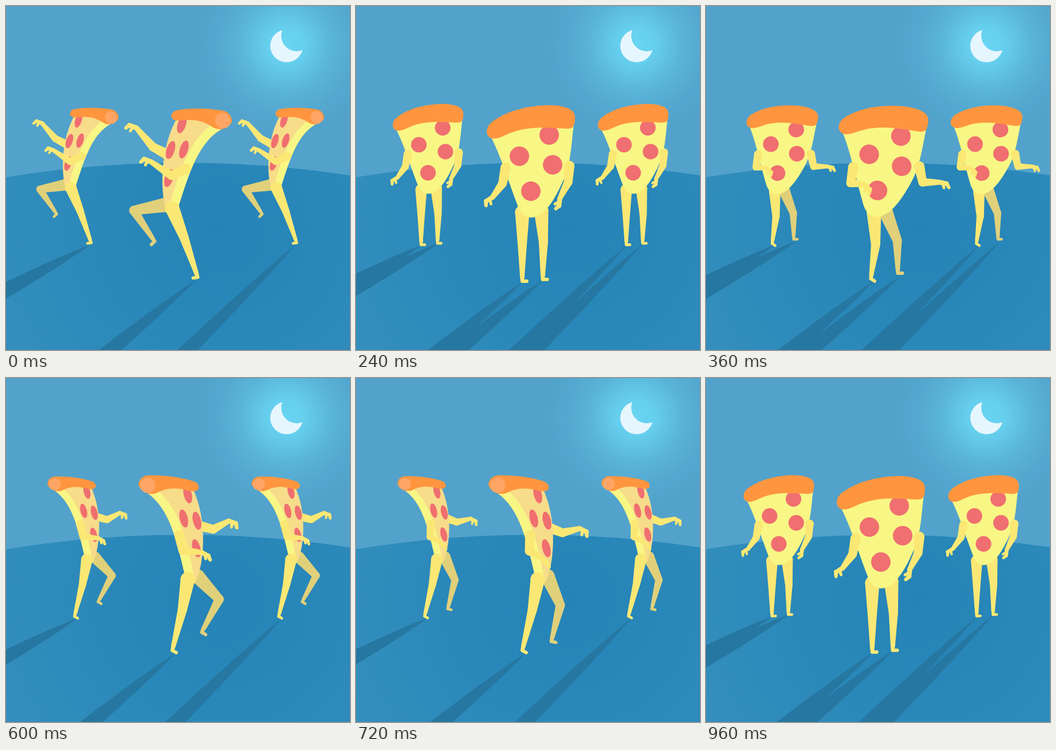
Animation, 600 px wide and 600 px high, one loop 1080 ms. Source, as an HTML page with a canvas:

```html
<!DOCTYPE html>
<html lang="en">
<head>
<meta charset="utf-8">
<title>Dancing pizza slices</title>
<style>
html, body { margin: 0; width: 100%; height: 100%; overflow: hidden; background: #52a2cb; }
canvas { display: block; width: 600px; height: 600px; }
</style>
</head>
<body>
<canvas id="stage" width="600" height="600"></canvas>
<script>
const ctx = document.getElementById('stage').getContext('2d');
const CHEESE = '#f8f785', FACE = '#f7dc8a', LIMB = '#fbe874', SHADE = '#e0d07a';
const CRUST = '#ff963f', CRUST_END = '#ffa666', SALAMI = '#f06f70';
const STEP = 120;
const rad = deg => deg * Math.PI / 180;

function disc(x, y, r, color) {
  ctx.fillStyle = color;
  ctx.beginPath();
  ctx.arc(x, y, r, 0, 7);
  ctx.fill();
}

function glow(x, y, r, stops) {
  const g = ctx.createRadialGradient(x, y, 0, x, y, r);
  stops.forEach(([at, color]) => g.addColorStop(at, color));
  return g;
}

// Draws a chain of tapered bones [angle, length, end radius] and returns its joints.
function chain(color, x, y, r, bones) {
  disc(x, y, r, color);
  return bones.map(([angle, length, r2]) => {
    const a = rad(angle), spread = Math.acos((r - r2) / length);
    const x2 = x + Math.cos(a) * length, y2 = y + Math.sin(a) * length;
    ctx.beginPath();
    ctx.arc(x, y, r, a + spread, a - spread);
    ctx.arc(x2, y2, r2, a - spread, a + spread);
    ctx.fill();
    [x, y, r] = [x2, y2, r2];
    return [x, y];
  });
}

function leg(x, y, thigh, shin, toe, length = 65, color = LIMB) {
  chain(color, x, y, 12.5, [[thigh, 55, 8], [shin, length - 9, 4], [shin, 9, 3], [toe, 8, 2.9]]);
}

function arm(x, y, upper, fore, length, hand, curl) {
  const joints = chain(LIMB, x, y, 9,
    [[upper, 28, 7.5], [fore, length, 4.3], [hand, 6, 4], [hand, 7, 3.7], [hand + curl, 8, 2.9]]);
  chain(LIMB, ...joints[2], 3, [[hand + curl * 1.3, 9, 2.4]]);
}

const profile = {
  body: 'M248 203C285 230 297 280 312 345L320 358Q330 362 333 352C347 315 350 245 326 194Q285 180 248 203Z',
  side: 'M246 200L268 200C300 230 316 280 330 359L310 359C297 280 285 230 246 200Z',
  crust: 'M231 188A17 17 0 0 1 247 171C275 170 305 174 327 181Q338 185 336 194C333 200 325 199 316 197C298 192 282 193 268 199A25 25 0 0 1 231 188Z',
  end: [247, 188],
  spots: [[317, 204], [310, 246], [333, 250], [332, 298]],
  spotSize: [7, 16, -.24]
};
const front = {
  body: 'M234 226C251 256 268 313 284 353Q292 369 306 369C332 367 350 330 362 303C375 275 376 237 380 205Q300 190 234 226Z',
  crust: 'M228 221C228 210 233 205 240 200C267 181 305 173 340 173C365 174 382 180 382 194C382 210 379 214 368 214C340 213 298 207 261 225C243 234 231 234 228 221Z',
  spots: [[337, 225], [285, 262], [343, 277], [305, 323]],
  spotSize: [17, 17, 0]
};

const facing = {
  slice: front,
  feet: [[291, 481], [327, 477]],
  back() {
    leg(290, 360, 90, 90, 0);
    leg(323, 357, 86, 91, 0);
  },
  front() {
    arm(261, 282, 101, 126, 30, 150, -60);
    arm(372, 279, 94, 117, 32, 95, 45);
  }
};

const turned = {
  slice: front,
  lean: [1, .1, -.09, 1, 23.2, -31.8],
  feet: [[295, 478], [339, 471]],
  back() {
    leg(313, 358, 68, 89, 0, 57, SHADE);
    leg(293, 361, 87, 98, 35, 60);
  },
  front() {
    arm(257, 281, 100, 7, 24, 40, 60);
    arm(372, 280, 78, 0, 29, 10, 50);
  }
};

const leftward = {
  slice: profile,
  lean: [-1, -.14, -.08, 1.02, 640, 42.8],
  feet: [[331, 478]],
  back() {
    leg(277, 347, 170, 56, 135, 65, SHADE);
    arm(281, 259, 208, 229, 44, 202, -60);
  },
  front() {
    leg(290, 353, 68, 71, 170, 73);
    arm(314, 284, 155, 214, 43, 203, -65);
  }
};

// From a raised knee and reaching arms (0) to a plain walking pose (1).
function rightward(t) {
  const mix = (a, b) => a + (b - a) * t;
  return {
    slice: profile,
    feet: [[297, 480]],
    back() {
      leg(334, 347, mix(27, 66), mix(132, 104), mix(48, 14), 65, SHADE);
      arm(334, mix(255, 261), mix(8, 21), mix(318, 346), 31, mix(10, 25), 60);
    },
    front() {
      leg(317, 352, 100, 104, 30, 72);
      arm(mix(301, 304), 275, mix(62, 94), mix(-19, 29), mix(42, 24), mix(12, 40), mix(60, 20));
    }
  };
}

// Pose, x of the left and right dancer, their y, shift of the middle one, mirrored.
const dance = [
  [leftward, -119, 239.5, 34.5, 0],
  [turned, -118, 239.5, 33, 0, true],
  [facing, -118.4, 239.4, 32.4, 0],
  [turned, -114.6, 241.6, 34, 0],
  [rightward(0), -112, 244, 36, 0],
  [rightward(.5), -112.5, 243.5, 35, -1],
  [rightward(1), -112.5, 243.2, 34.5, -1],
  [turned, -113, 243.5, 33, -1],
  [facing, -117, 240.1, 31, -2]
];
const shadowRays = [[-141, 76], [-147, 121], [-187, 183]];

function drawSlice({ slice, lean }) {
  const fill = (path, color) => {
    ctx.fillStyle = color;
    ctx.fill(new Path2D(path));
  };
  ctx.save();
  if (lean) ctx.transform(...lean);
  fill(slice.body, slice.side ? FACE : CHEESE);
  ctx.save();
  ctx.clip(new Path2D(slice.body));
  ctx.fillStyle = SALAMI;
  for (const [x, y] of slice.spots) {
    ctx.beginPath();
    ctx.ellipse(x, y, ...slice.spotSize, 0, 7);
    ctx.fill();
  }
  if (slice.side) fill(slice.side, CHEESE);
  ctx.restore();
  fill(slice.crust, CRUST);
  if (slice.end) disc(...slice.end, 13.3, CRUST_END);
  ctx.restore();
}

function addShadow(x, y, [dx, dy]) {
  const len = Math.hypot(dx, dy);
  const at = (t, w) => [x + dx * t - dy / len * w, y + dy * t + dx / len * w];
  ctx.moveTo(x, y);
  ctx.quadraticCurveTo(...at(.45, 10), ...at(1.4, 15));
  ctx.lineTo(...at(1.4, -15));
  ctx.quadraticCurveTo(...at(.45, -10), x, y);
}

const sky = glow(488, 68, 160, [[0, '#68d5f2'], [.2, '#66cfee'], [.5, '#5ab4d9'], [.75, '#54a8d0'], [1, '#52a2cb']]);
const ground = glow(370, 385, 430, [[0, '#2583b7'], [.4, '#2987b9'], [1, '#348fbc']]);

function drawScene() {
  ctx.fillStyle = sky;
  ctx.fillRect(0, 0, 600, 600);
  ctx.fillStyle = '#e6f6fe';
  ctx.fill(new Path2D('M482 42A28.5 28.5 0 1 0 517 77A27 27 0 0 1 482 42Z'));
  disc(310, 2195.5, 1922, ground);
}

function draw(now) {
  const [pose, left, right, top, shift, mirrored] = dance[Math.floor(now / STEP) % dance.length];
  const places = [[left, top, .8], [0, shift, 1], [right, top, .8]];
  const flip = x => mirrored ? 616 - x : x;
  drawScene();

  ctx.beginPath();
  places.forEach(([x, y, s], i) => pose.feet.forEach(([fx, fy]) =>
    addShadow(x + flip(fx) * s, y + fy * s, shadowRays[i])));
  ctx.fillStyle = '#2677a1';
  ctx.fill();

  for (const [x, y, s] of places) {
    ctx.save();
    ctx.translate(x, y);
    ctx.scale(s, s);
    if (mirrored) ctx.transform(-1, 0, 0, 1, 616, 0);
    pose.back();
    drawSlice(pose);
    pose.front();
    ctx.restore();
  }
}

const start = performance.now();
function tick() {
  draw(performance.now() - start);
  requestAnimationFrame(tick);
}
tick();
</script>
</body>
</html>
```
